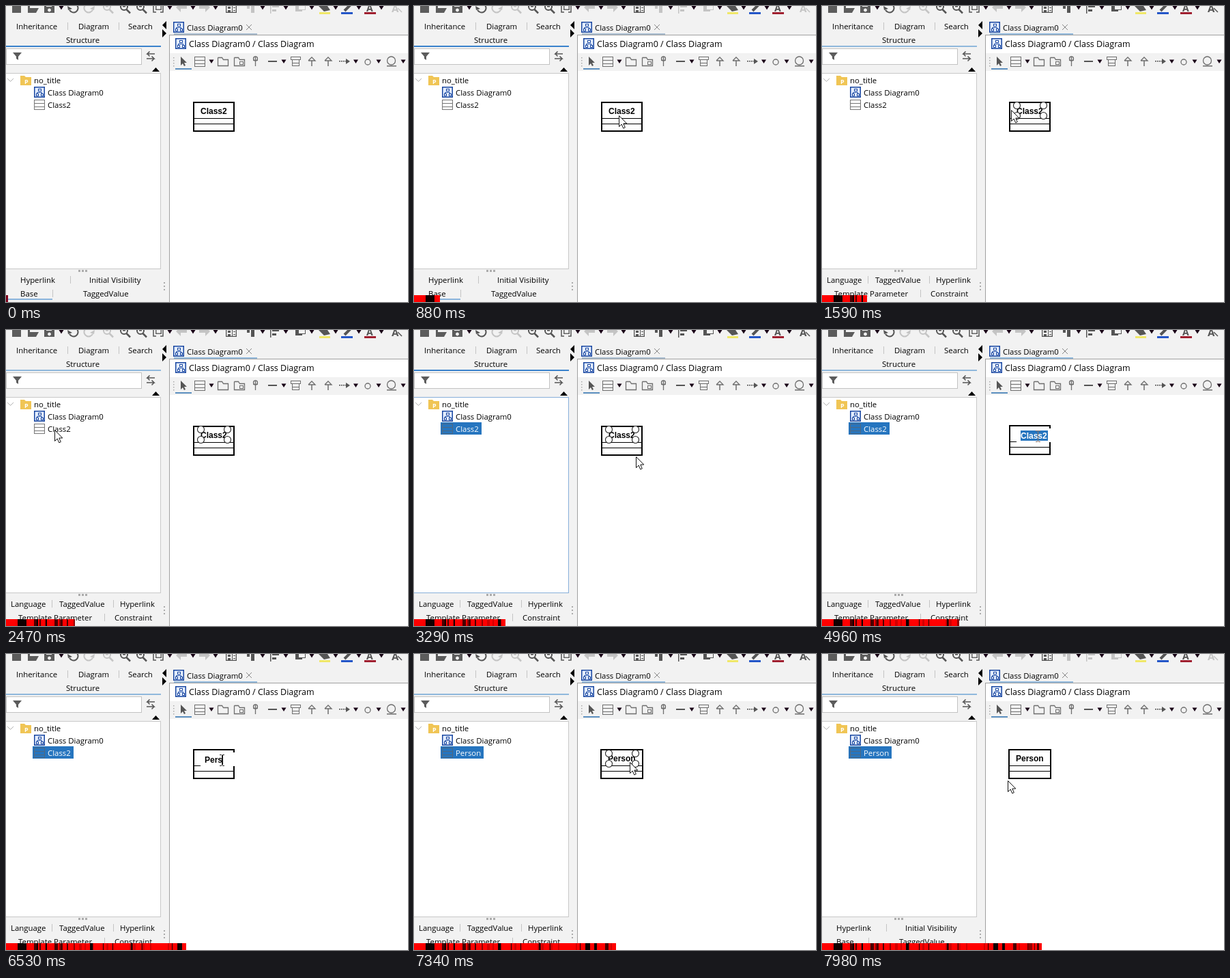
Recreate the animation shown at these times as an HTML page with a canvas. Size 589 px wide and 433 px high, loop 8000 ms.

```html
<!DOCTYPE html>
<html lang="en">
<head>
<meta charset="utf-8">
<title>Renaming a class</title>
<style>
html, body { margin: 0; width: 100%; height: 100%; overflow: hidden; background: #f2f2f2; }
canvas { display: block; }
</style>
</head>
<body>
<canvas id="stage" width="589" height="433"></canvas>
<script>
const LOOP = 8000;
const ctx = document.getElementById('stage').getContext('2d');
const UI = '"Open Sans", sans-serif';
const BOLD = 'bold 12px "Liberation Sans", Arial, sans-serif';
const GREY = '#6e6e6e', PALE = '#c4c4c4', DARK = '#180016', BLUE = '#2675bf', NAVY = '#1846a0';

// Moments at which the interface changes, in ms
const AT = { enter: 140, select: 1000, treeClick: 2600, deselect: 3450, hover: 3750,
  reselect: 4250, edit: 4500, clear: 5500, commit: 7200, done: 7750 };
const KEYS = [5700, 5950, 6200, 6450, 6680, 6850];
const PATH = [[140, 440, 330], [500, 350, 215], [800, 300, 160], [1500, 300, 158], [1580, 277, 152],
  [1639, 277, 152], [1640, 196, 152], [1900, 110, 150], [2200, 71, 146], [2700, 71, 146],
  [2950, 170, 160], [3250, 325, 185], [3500, 325, 185], [3800, 316, 158], [7450, 316, 158],
  [7700, 272, 185]];

function box(x, y, w, h, color) { ctx.fillStyle = color; ctx.fillRect(x, y, w, h); }
function frame(x, y, w, h, color, fill, width = 1) {
  if (fill) box(x, y, w, h, fill);
  ctx.strokeStyle = color;
  ctx.lineWidth = width;
  ctx.strokeRect(x + width / 2, y + width / 2, w - width, h - width);
}
function line(points, color = GREY, width = 1.3, fill) {
  ctx.beginPath();
  for (let i = 0; i < points.length; i += 2) ctx.lineTo(points[i], points[i + 1]);
  if (fill) { ctx.closePath(); ctx.fillStyle = fill; ctx.fill(); }
  ctx.strokeStyle = color;
  ctx.lineWidth = width;
  if (width) ctx.stroke();
}
function shape(points, color) {
  ctx.beginPath();
  for (let i = 0; i < points.length; i += 2) ctx.lineTo(points[i], points[i + 1]);
  ctx.fillStyle = color;
  ctx.fill();
}
function ring(x, y, r, color = GREY, fill, width = 1.3, from = 0, to = 7) {
  ctx.beginPath();
  ctx.arc(x, y, r, from, to);
  if (fill) { ctx.fillStyle = fill; ctx.fill(); }
  ctx.strokeStyle = color;
  ctx.lineWidth = width;
  ctx.stroke();
}
function text(s, x, y, color = '#000', font = '11.4px ' + UI) {
  ctx.font = font;
  ctx.fillStyle = color;
  ctx.fillText(s, x, y);
}
function drop(x, y) { shape([x - 3.5, y - 2.5, x + 3.5, y - 2.5, x, y + 3], DARK); }

function diagramIcon(x, y) {
  frame(x, y, 16, 16, NAVY, '#e4eeff', 1.5);
  frame(x + 6, y + 3, 5, 4, NAVY, '#fff');
  frame(x + 3, y + 10, 4, 4, NAVY, '#fff');
  frame(x + 10, y + 10, 4, 4, NAVY, '#fff');
  line([x + 4.5, y + 10, x + 4.5, y + 8.5, x + 11.5, y + 8.5, x + 11.5, y + 10], NAVY, 1);
}
function classIcon(x, y, color = GREY, fill) {
  frame(x, y, 16, 15, color, fill);
  box(x, y + 5, 16, 1, color);
  box(x, y + 10, 16, 1, color);
}
function folder(x, y) {
  line([x, y, x + 6, y, x + 8, y + 3, x + 15, y + 3, x + 15, y + 12, x, y + 12, x, y]);
}

function topToolbar(active) {
  const tone = active ? '#555' : PALE;
  box(9, 0, 13, 10, '#5c5c5c');
  shape([32, 0, 35, 0, 35, 3, 48, 3, 44, 10, 32, 10], '#5c5c5c');
  box(56, 0, 15, 10, '#5c5c5c');
  box(59, 0, 8, 1, '#f2f2f2');
  ring(63.5, 6, 2, '#f2f2f2', '#f2f2f2', 1);
  drop(81, 2.5);
  ring(99, 3, 6.5, '#555', null, 2, -.6, 2.7);
  shape([90, 0, 91, 6, 97, 4], '#555');
  ring(121, 3, 6.5, PALE, null, 2, .4, 3.8);
  shape([130, 0, 129, 6, 123, 4], PALE);
  for (const [x, color] of [[148, PALE], [173, '#555'], [197, '#555']]) {
    ring(x, 1, 5, color, null, 2);
    line([x + 3.5, 5, x + 9, 10.5], color, 2.5);
    box(x - 2, 0, 4, 1.5, color);
  }
  line([216, 0, 216, 9, 220, 9], '#555', 1.5);
  line([226, 9, 230, 9, 230, 0], '#555', 1.5);
  frame(219, -2, 9, 8, '#666', null, 1.5);
  shape([249, 2, 256, -4, 256, 9], PALE);
  box(255, 0, 10, 4, PALE);
  shape([299, 2, 292, -4, 292, 9], PALE);
  box(283, 0, 10, 4, PALE);
  for (const x of [240, 274, 307, 376, 410, 448, 483, 517, 550]) drop(x, 2.5);
  frame(322, -3, 16, 13, '#555', null, 1.3);
  box(325, 1, 4, 3, '#555');
  box(325, 6, 4, 3, '#555');
  box(331, 0, 1, 10, '#555');
  box(333, 2, 3, 1, '#555');
  box(333, 6, 3, 1, '#555');
  box(353, 0, 4, 4, tone);
  box(359, 0, 5, 10, tone);
  box(387, 0, 1.5, 11, tone);
  box(390, 0, 10, 2, tone);
  box(390, 5, 6, 3, tone);
  box(424, 0, 10, 8, tone);
  frame(428, -3, 11, 9, tone, '#f2f2f2');
  shape([458, 0, 471, 0, 475, 6, 466, 8], '#555');
  box(459, 9, 16, 3, '#f0e868');
  line([496, 7, 505, -2], '#555', 4);
  box(491, 9, 17, 3, '#2456c8');
  text('A', 528, 8, '#555', 'bold 14px ' + UI);
  box(525, 9, 17, 3, '#a02030');
  text('A', 565, 9, tone, 'bold 15px ' + UI);
  line([574, 3, 580, 9], tone, 1.5);
}

function diagramToolbar() {
  for (let y = 75; y < 90; y += 4) box(245, y, 1.5, 1.5, '#aaa');
  shape([256, 74, 265, 83, 261, 83, 263, 87, 261, 88, 259, 84, 256, 87], '#555');
  box(248, 91, 24, 2, '#5b8fbf');
  classIcon(276, 74);
  folder(310.5, 75.5);
  folder(334.5, 75.5);
  frame(342, 81, 6, 5, GREY);
  ring(365.5, 77, 3);
  line([365.5, 74, 365.5, 88]);
  line([362, 79.5, 369, 79.5]);
  box(384, 80, 13, 2, '#555');
  frame(417, 74, 15, 5, GREY);
  frame(419, 78, 11, 10, GREY);
  box(419, 83, 11, 1, GREY);
  for (const x of [448, 472]) {
    line([x, 80, x, 88], GREY, 1.5);
    line([x - 5, 80, x, 75, x + 5, 80, x - 5, 80], GREY, 1.3);
  }
  for (let x = 488; x < 499; x += 3) box(x, 80, 2, 1.5, '#555');
  shape([498, 77, 504, 81, 498, 85], '#555');
  ring(530, 82, 4);
  ring(564.5, 80, 6);
  box(558, 87, 14, 1.5, GREY);
  for (const x of [301, 407, 512.5, 546, 582]) drop(x, 81);
}

function tabSeparators(list) {
  for (const [x, y] of list) box(x, y, 1, 11, '#c4c4c4');
}

function bottomTabs(selected) {
  if (selected) {
    text('Language', 7, 405);
    text('TaggedValue', 78, 405);
    text('Hyperlink', 167, 405);
    text('Template Parameter', 18, 425);
    text('Constraint', 159, 425);
    tabSeparators([[67, 395], [157, 395], [144, 415]]);
  } else {
    text('Hyperlink', 21, 405);
    text('Initial Visibility', 122, 405);
    text('Base', 21, 425);
    text('TaggedValue', 113, 425);
    tabSeparators([[94, 395], [68, 415]]);
    box(0, 428, 68, 2, '#8ab4dc');
  }
}

function leftPanel(name, picked, focused, treeFocused) {
  text('Inheritance', 15, 34);
  text('Diagram', 106, 34);
  text('Search', 179, 34);
  text('Structure', 88, 54);
  tabSeparators([[90, 24], [165, 24]]);
  box(0, 58, 227, 2, focused ? '#3a82cc' : '#90b8dc');
  frame(0, 62, 199, 24, '#c2c2c2', '#fff');
  shape([10, 68, 23, 68, 18, 74, 18, 79, 15, 77, 15, 74], '#5c5c5c');
  line([218, 70, 207, 70, 210.5, 66.5], '#555', 1.6);
  line([207, 70, 210.5, 73.5], '#555', 1.6);
  line([206, 77, 217, 77, 213.5, 73.5], '#555', 1.6);
  line([217, 77, 213.5, 80.5], '#555', 1.6);
  shape([214, 96, 225, 96, 219.5, 90], '#000');
  frame(-1, 98, 228, 287, treeFocused ? '#87afda' : '#c8c8c8', '#fff');
  line([2, 106, 6.5, 110.5, 11, 106], '#b0b0b0', 1);
  shape([21, 102, 27, 102, 29, 104, 37, 104, 37, 116, 21, 116], '#f0c555');
  text('P', 27, 114, '#fff', 'bold 9px ' + UI);
  text('no_title', 41, 113);
  diagramIcon(41, 118);
  text('Class Diagram0', 61, 131);
  if (picked) box(39, 135, name === 'Person' ? 63 : 60, 18, BLUE);
  classIcon(41, 137, picked ? '#4f6880' : '#777', picked ? null : '#fff');
  text(name, 61, 149, picked ? '#fff' : '#000');
  for (const x of [106, 111, 116]) box(x, 386, 3, 3, '#aaa');
  for (const y of [404, 409, 414]) box(231, y, 2, 2, '#aaa');
  shape([235, 22, 235, 34, 229, 28], '#000');
  shape([229, 34, 229, 46, 235, 40], '#000');
}

function diagramPanel(focused) {
  diagramIcon(245, 23);
  text('Class Diagram0', 265, 36);
  line([352, 27, 360, 35], '#888', 1);
  line([360, 27, 352, 35], '#888', 1);
  box(246, 40, 122, 2, focused ? '#90b8dc' : '#a8bccf');
  box(240, 42, 349, 27, '#fff');
  box(239, 42, 350, 1, '#a0a0a0');
  diagramIcon(248, 47);
  text('Class Diagram0 / Class Diagram', 268, 60, '#000', '12.5px ' + UI);
  box(240, 95, 349, 338, '#fff');
  box(239, 42, 1, 391, '#a0a0a0');
  diagramToolbar();
}

function classBox(name, editing, selected, highlighted) {
  const renamed = name === 'Person' && !editing;
  const x = renamed ? 273 : 274, w = renamed ? 63 : 61, y = renamed || editing ? 139 : 140;
  frame(x, y, w, 44, '#000', '#fff', 2);
  box(x, y + 24, w, 1, '#000');
  box(x, y + 32, w, 1, '#000');
  if (editing) {
    box(285, 144, 52, 20, '#fff');
    if (highlighted) box(291, 147, 40, 15, BLUE);
    text(name, 291, 159, highlighted ? '#fff' : '#000', BOLD);
    if (!highlighted) box(Math.round(291 + ctx.measureText(name).width), 147, 1, 15, '#000');
    return;
  }
  text(name, renamed ? 284 : 285, y + 18, '#000', BOLD);
  if (selected)
    for (const cx of [285.5, 324.5]) for (const cy of [145.5, 160.5]) ring(cx, cy, 5, '#222', '#fff', 1.1);
}

function hoverHandles() {
  box(294, 190, 12, 2, '#555');
  shape([308, 186, 318, 186, 313, 195], '#444');
  ring(324, 163, 3.5, '#f0b060', '#f0b060', 1);
}

function pointer(t) {
  if (t < AT.enter) return;
  let i = PATH.findIndex(p => p[0] > t);
  if (i < 0) i = PATH.length;
  const a = PATH[i - 1], b = PATH[i] || a;
  const k = b === a ? 0 : (t - a[0]) / (b[0] - a[0]);
  const x = Math.round(a[1] + (b[1] - a[1]) * k), y = Math.round(a[2] + (b[2] - a[2]) * k);
  if (t > AT.edit && t < AT.commit) {
    const c = t < AT.clear ? '#8a7468' : '#333';
    box(316, 148, 1, 15, c);
    for (const edge of [147, 163]) {
      box(313, edge, 3, 1, c);
      box(317, edge, 3, 1, c);
    }
    return;
  }
  line([0, 0, 0, 16, 3.7, 12.5, 6.2, 18.3, 8.8, 17.2, 6.3, 11.5, 11.3, 11.5, 0, 0]
    .map((v, n) => v + (n % 2 ? y : x) + .5), '#111', 1, '#fff');
}

function progressBar(t) {
  const width = Math.floor(3 + t * .04);
  const shades = ['#100000', '#4a0000', '#900000', '#d00000'];
  box(0, 423, width, 10, '#f00');
  for (let x = 17, seed = 11; x < width;) {
    seed = seed * 16807 % 2147483647;
    const r = seed / 2147483647, step = 1 + Math.floor(r * 97 % 4);
    if (r < .33 || x < 29) box(x, 423, Math.min(step, width - x), 10, shades[x < 29 ? 0 : seed % 4]);
    x += step;
  }
  if (t < 70) box(0, 423, width, 10, '#80001c');
}

function draw(t) {
  const editing = t >= AT.edit && t < AT.commit;
  const selected = (t >= AT.select && t < AT.deselect) || (t >= AT.reselect && t < AT.done);
  const typed = 'Person'.slice(0, KEYS.filter(k => t >= k).length);
  const treeFocused = t >= AT.treeClick && t < AT.deselect;
  const panelFocused = treeFocused || t < AT.select;
  box(0, 0, 589, 433, '#f2f2f2');
  topToolbar(selected);
  leftPanel(t >= AT.commit ? 'Person' : 'Class2', t >= AT.treeClick, panelFocused, treeFocused);
  bottomTabs(selected);
  diagramPanel(!panelFocused);
  classBox(t < AT.clear ? 'Class2' : typed, editing, selected, t < AT.clear);
  if (t >= AT.hover && t < AT.reselect) hoverHandles();
  pointer(t);
  progressBar(t);
}

const start = performance.now();
function tick() {
  draw((performance.now() - start) % LOOP);
  requestAnimationFrame(tick);
}
tick();
</script>
</body>
</html>
```
